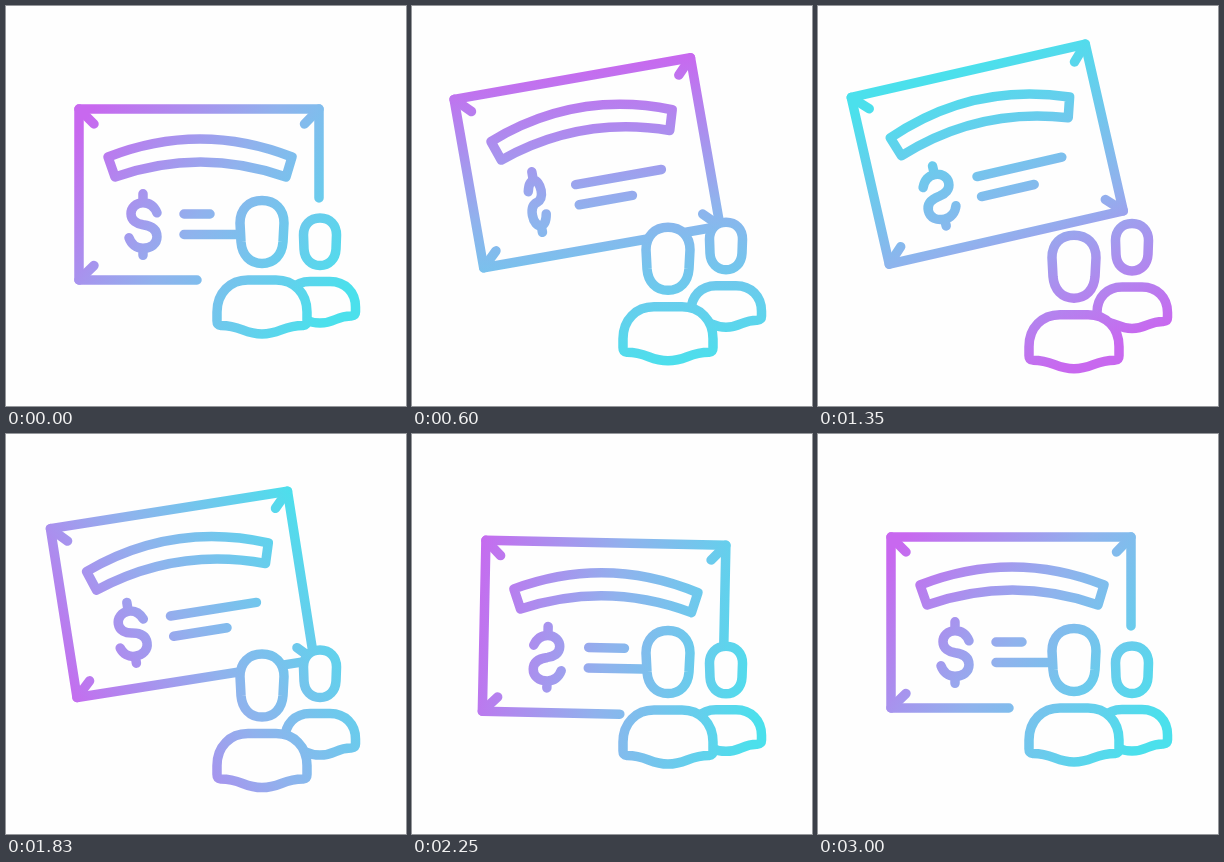
Animation of 400 by 400 pixels, one loop 5.03 s. Source, as an HTML page:

```html
<!DOCTYPE html>
<html lang="en">
<head>
<meta charset="utf-8">
<title>Certificate and people</title>
<style>
  html, body { margin: 0; width: 100%; height: 100%; overflow: hidden; background: #fefefe; }
  svg { display: block; width: 100%; height: 100%; }
  #art { fill: none; stroke: #fff; stroke-width: 9.5; stroke-linecap: round; stroke-linejoin: round; }
  .solid { fill: #000; }
</style>
</head>
<body>
<svg viewBox="0 0 400 400">
  <defs>
    <linearGradient id="tint" gradientUnits="userSpaceOnUse">
      <stop offset="0" stop-color="#c868ef"/>
      <stop offset=".48" stop-color="#90b2ed"/>
      <stop offset="1" stop-color="#4be0ec"/>
    </linearGradient>
    <!-- White strokes show the gradient, black fills hide what lies behind -->
    <mask id="lines" maskUnits="userSpaceOnUse" x="0" y="0" width="400" height="400">
      <g id="art">
        <!-- Card, with its bottom left corner at 0,0 -->
        <g id="card">
          <path id="border"/>
          <path d="M0-171l15 15M240-171l-14.500 15M0 0l15-14.500"/>
          <path id="tick"/>
          <path d="M29-123Q121-159 213-123L207-103Q121.500-133 36-103Z"/>
          <path id="text"/>
          <path id="dollar" vector-effect="non-scaling-stroke" d="M14-12C11-19 6-22 0-22C-7-22-12-17-12-11C-12-4-6-1 0 0C7 1 14 4 14 12C14 19 8 23.500 0 23.500C-7 23.500-12 19-14 13M0-31V-22M0 23.500V30.500"/>
        </g>
        <g id="back" class="solid">
          <path d="M297.500 229C297.500 219 304 212 314 212S330.500 219 330.500 229L330 243C329.500 253 323 259.500 314 259.500S298.500 253 298 243Z"/>
          <path d="M279 306V301C279 286 289 275.500 304 275.500H324C339 275.500 349.500 286 349.500 301V306Q349.500 309.500 345 310C330 310 329 317 314 317S298 310 283 310Q279 309.500 279 306Z"/>
        </g>
        <g id="front" class="solid">
          <path d="M234 217C234 203 243 194.500 256 194.500S278 203 278 217L277 236C276 249 268 257.500 256 257.500S236 249 235 236Z"/>
          <path d="M211 315V306C211 287 224 274 242 274H270C288 274 301 287 301 306V315Q301 319 297 319.500C277 319.500 274 328 256 328S235 319.500 215 319.500Q211 319 211 315Z"/>
        </g>
      </g>
    </mask>
  </defs>
  <rect width="400" height="400" fill="url(#tint)" mask="url(#lines)"/>
</svg>
<script>
const LOOP = 5030, ACTIVE = 3000, HALF = 1200;
const $ = id => document.getElementById(id);
const set = (id, attrs) => {
  for (const key in attrs) $(id).setAttribute(key, attrs[key]);
};
const clamp = v => Math.max(0, Math.min(1, v));
const mix = (a, b, k) => a + (b - a) * k;
const smooth = v => (v = clamp(v)) * v * (3 - 2 * v);

// Cubic bezier easing with control points (x1, 0) and (x2, 1)
function bezier(x1, x2) {
  return v => {
    v = clamp(v);
    let lo = 0, hi = 1;
    for (let i = 0; i < 24; i++) {
      const u = (lo + hi) / 2, w = 1 - u;
      const x = 3 * u * w * w * x1 + 3 * u * u * w * x2 + u ** 3;
      if (x < v) lo = u; else hi = u;
    }
    return lo * lo * (3 - 2 * lo);
  };
}
const rise = bezier(.33, .25);
const fall = bezier(.75, .67);
const turn = bezier(.33, .4);

const REST = { x: 73, y: 274, a: 0 };
const LIFT = { x: 71.3, y: 258, a: -13 };
const DIP = { x: 70.3, y: 278.5, a: 2.1 };

function cardPose(t) {
  const [from, to, k] =
    t < HALF ? [REST, LIFT, rise(t / HALF)] :
    t < 2 * HALF ? [LIFT, DIP, fall(t / HALF - 1)] :
    [DIP, REST, smooth((t - 2 * HALF) / (ACTIVE - 2 * HALF))];
  return ["x", "y", "a"].map(key => mix(from[key], to[key], k));
}

function draw(t) {
  const [x, y, angle] = cardPose(t);
  const sink = t < HALF ? rise(t / HALF) : 1 - fall(t / HALF - 1);
  const open = t < HALF ? smooth(t / 490) : 1 - smooth((t - 1885) / 490);

  set("card", { transform: `translate(${x} ${y}) rotate(${angle})` });
  set("border", { d: `M${mix(118, 240, open)} 0H0V-171H240V${mix(-82, 0, open)}` });
  set("tick", {
    d: `M240 0l${-15 * open} ${-15 * open}`,
    visibility: open > .02 ? "visible" : "hidden"
  });
  set("text", { d: `M105-66h${mix(26, 87, open)}M105-45.500h54` });

  const spin = Math.cos(Math.min(t, 2700) * .4 * Math.PI / 180);
  set("dollar", { transform: `translate(64 -55.200) scale(${spin} 1)` });

  set("front", { transform: `translate(0 ${35 * sink})` });
  set("back", { transform: `translate(0 ${5.5 * sink})` });

  const dir = (35 + 360 * turn(t / ACTIVE)) * Math.PI / 180;
  const dx = 156 * Math.cos(dir), dy = 156 * Math.sin(dir);
  set("tint", { x1: 202 - dx, y1: 210 - dy, x2: 202 + dx, y2: 210 + dy });
}

const start = performance.now();
function tick() {
  draw(Math.min((performance.now() - start) % LOOP, ACTIVE));
  requestAnimationFrame(tick);
}
tick();
</script>
</body>
</html>
```
